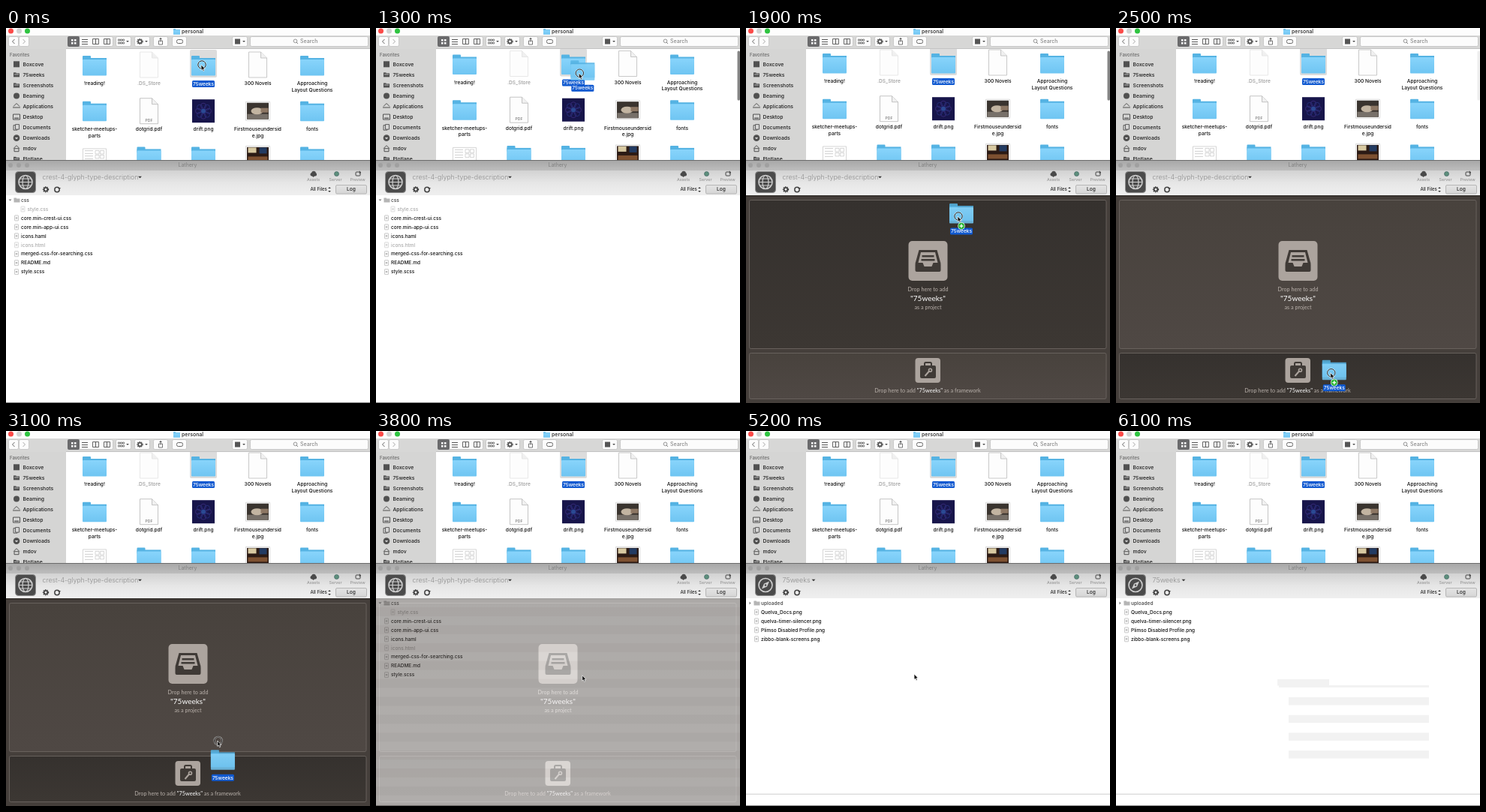
Write an HTML page with a canvas that moves like this. It is 485x500 px and loops after 6600 ms.

```html
<!DOCTYPE html>
<html lang="en">
<head>
<meta charset="utf-8">
<title>Drop a folder</title>
<style>
html, body { margin: 0; width: 100%; height: 100%; overflow: hidden; background: #fff; }
canvas { display: block; }
</style>
</head>
<body>
<canvas id="stage" width="485" height="500"></canvas>
<script>
const W = 485, H = 500, LOOP = 6600, STEP = 100, ROW = 11.95;
const SPLIT = 176, LIST_TOP = 223, TURN = Math.PI * 2;
const UI = 'Inter, sans-serif', SLAB = 'Lato, sans-serif';
const PROJECT = '75weeks';
const screen = document.getElementById('stage').getContext('2d');
const layer = document.createElement('canvas');
layer.width = W;
layer.height = H;
const layerCtx = layer.getContext('2d');
let c = screen;

const clamp = f => Math.min(1, Math.max(0, f));
const span = (t, from, to) => clamp((t - from) / (to - from));
const mix = (a, b, f) => a + (b - a) * f;
const smooth = f => f * f * (3 - 2 * f);
const times = (n, draw) => { for (let i = 0; i < n; i++) draw(i); };

// --- drawing helpers ---
function rect(x, y, w, h, fill) {
  c.fillStyle = fill;
  c.fillRect(x, y, w, h);
}

function paint(fill, stroke, lw = 1) {
  if (fill) { c.fillStyle = fill; c.fill(); }
  if (stroke) { c.strokeStyle = stroke; c.lineWidth = lw; c.stroke(); }
}

function box(x, y, w, h, r, fill, stroke, lw) {
  c.beginPath();
  c.roundRect(x, y, w, h, r);
  paint(fill, stroke, lw);
}

function oval(x, y, rx, ry, fill, stroke, lw) {
  c.beginPath();
  c.ellipse(x, y, rx, ry, 0, 0, TURN);
  paint(fill, stroke, lw);
}

const disc = (x, y, r, fill) => oval(x, y, r, r, fill);
const ring = (x, y, r, stroke, lw) => oval(x, y, r, r, null, stroke, lw);

function path(points, fill, stroke, lw) {
  c.beginPath();
  for (let i = 0; i < points.length; i += 2) c.lineTo(points[i], points[i + 1]);
  paint(fill, stroke, lw);
}

// Trapezoid symmetric about x.
function taper(x, top, bottom, half, foot, fill) {
  path([x - half, top, x + half, top, x + foot, bottom, x - foot, bottom], fill);
}

// Triangle pointing along a quarter turn: 0 right, 1 down, 2 left, 3 up.
function arrow(x, y, s, quarter, fill, stroke) {
  c.save();
  c.translate(x, y);
  c.rotate(quarter * Math.PI / 2);
  path([-s / 2, -s, s / 2, 0, -s / 2, s], fill, stroke);
  c.restore();
}

function text(s, x, y, size, color = '#111', align = 'left', weight = 500, font = UI) {
  c.font = `${weight} ${size}px ${font}`;
  c.fillStyle = color;
  c.textAlign = align;
  c.textBaseline = 'middle';
  c.fillText(s, x, y);
}

function ramp(y0, y1, ...colors) {
  const g = c.createLinearGradient(0, y0, 0, y1);
  colors.forEach((color, i) => g.addColorStop(i / (colors.length - 1), color));
  return g;
}

// --- icons ---
function folder(x, y, k = 1) {
  box(x - 16 * k, y - 13 * k, 11 * k, 8 * k, k, '#55b3e3');
  rect(x - 16 * k, y - 10 * k, 32 * k, 20 * k, '#55b3e3');
  box(x - 16 * k, y - 8 * k, 32 * k, 21.5 * k, k, ramp(y - 8 * k, y + 13 * k, '#88d4fb', '#6fc5f2'));
}

function page(x, y, stroke) {
  const l = x - 12, r = x + 12, t = y - 17, b = y + 17, fold = 8;
  path([l, t, r - fold, t, r, t + fold, r, b, l, b, l, t], '#fdfdfd', stroke, 0.8);
  path([r - fold, t, r - fold, t + fold, r, t + fold], '#f0f0f0', stroke, 0.8);
}

function gear(x, y, r, color) {
  ring(x, y, r * 0.65, color, r * 0.5);
  c.setLineDash([r * 0.36, r * 0.36]);
  ring(x, y, r, color, r * 0.35);
  c.setLineDash([]);
}

function miniFile(x, y, stroke) {
  box(x - 2.5, y - 3.5, 5, 7, 0.5, '#fafafa', stroke, 0.7);
  rect(x - 1.2, y - 1, 2.4, 2, stroke);
}

function miniFolder(x, y, color) {
  rect(x - 4, y - 3, 3.5, 2, color);
  rect(x - 4, y - 2, 8, 5, color);
}

// --- file browser window ---
function nameTag(x, y) {
  box(x - 15, y - 4.5, 30, 9, 1.5, '#1059d0');
  text(PROJECT, x, y + 0.3, 6.6, '#fff', 'center');
}

function toolbar() {
  const ink = '#555', mid = 18;
  const button = (x, w) => box(x + 0.5, 11.5, w, 13, 2, '#fcfcfc', '#c2c2c2', 0.8);
  rect(0, 0, W, 28, '#fdfdfd');
  rect(0, 10, W, 18, '#d7d7d6');
  rect(80, 27, W - 80, 1, '#c4c4c4');
  ['#fc4a48', '#d2d2d2', '#2fc441'].forEach((color, i) => disc(6.5 + i * 11, 4, 3.5, color));
  folder(227.5, 5, 0.28);
  text('personal', 234, 5, 7, '#222');

  button(3, 13);
  button(17, 13);
  arrow(10, mid, 3, 2, null, '#666');
  arrow(24, mid, 3, 0, null, '#aaa');
  button(82, 60);
  box(82, 11, 16, 14, 2, '#6a6a6c');
  times(4, i => rect(87 + i % 2 * 4, 15 + (i >> 1) * 4, 2.5, 2.5, '#fff'));
  times(3, i => rect(101, 15 + i * 3, 8, 1, ink));
  times(2, i => {
    box(115.5 + i * 15, 14.5, 8, 7, 0, null, ink, 0.9);
    rect(119 + i * 15, 14.5, 1, 7, ink);
  });
  button(146, 20);
  times(6, i => box(149.5 + i % 3 * 3, 15 + (i / 3 | 0) * 4, 2, 2, 0, null, ink, 0.7));
  button(171, 20);
  gear(178.5, mid, 3.6, ink);
  button(196, 19);
  box(203.5, 17, 5, 5, 0, null, ink, 0.8);
  rect(205.6, 13.5, 0.8, 5, ink);
  arrow(206, 14, 2, 3, ink);
  button(221, 19);
  box(227.5, 15.5, 8, 5, 2, null, ink, 0.9);
  button(301, 20);
  rect(305, 14.5, 7, 7, ink);
  [162, 187, 317].forEach(x => arrow(x, mid, 1.8, 1, '#444'));
  button(325, 157);
  ring(385.5, 17.3, 2.3, '#888', 0.9);
  path([387, 19, 389, 21], null, '#888');
  text('Search', 392, mid + 0.3, 7, '#888');
}

const sideInk = '#505050';
const sideIcons = {
  square: (x, y) => rect(x - 4, y - 4, 8, 8, sideInk),
  disc: (x, y) => disc(x, y, 4, sideInk),
  folder: (x, y) => {
    miniFolder(x, y, sideInk);
    rect(x - 3, y - 0.8, 6, 0.8, '#ccc');
  },
  apps: (x, y) => {
    arrow(x, y - 2, 4, 3, null, sideInk);
    rect(x - 5, y + 1, 10, 1, sideInk);
  },
  desk: (x, y) => {
    box(x - 4.5, y - 3.5, 9, 7, 0, null, sideInk);
    rect(x - 3, y + 1, 6, 1.2, sideInk);
  },
  docs: (x, y) => times(2, i => box(x - 4 + i * 2.5, y - 3 - i, 5, 6.5, 0, '#d5d5d5', sideInk, 0.9)),
  down: (x, y) => {
    disc(x, y, 4.3, sideInk);
    arrow(x, y + 0.5, 2.2, 1, '#ddd');
  },
  home: (x, y) => {
    arrow(x, y - 2, 4, 3, null, sideInk);
    box(x - 3, y, 6, 4, 0, null, sideInk);
  }
};
const places = [
  ['Boxcove', 'square'], [PROJECT, 'folder'], ['Screenshots', 'folder'], ['Beaming', 'disc'],
  ['Applications', 'apps'], ['Desktop', 'desk'], ['Documents', 'docs'], ['Downloads', 'down'],
  ['mdov', 'home'], ['Plotlane', 'folder']
];

function sidebar() {
  rect(0, 28, 80, SPLIT - 27, '#d5d5d4');
  text('Favorites', 5, 36.3, 6, '#666');
  places.forEach(([name, icon], i) => {
    const y = 48.3 + i * 14.05;
    sideIcons[icon](14, y);
    text(name, 22.5, y + 0.4, 6.8, '#1c1c1c');
  });
}

function frame(x, y, h, fill) {
  box(x - 16, y - h / 2, 32, h, 0, '#fff', '#ccc', 0.7);
  rect(x - 14.5, y - h / 2 + 1.5, 29, h - 3, fill);
}

const thumbs = {
  folder,
  page: (x, y) => page(x, y - 1, '#bbb'),
  faint: (x, y) => page(x, y - 1, '#e2e2e2'),
  chosen: (x, y) => {
    box(x - 18, y - 21, 36, 37, 2, '#dcdcdc');
    folder(x, y);
  },
  pdf: (x, y) => {
    page(x, y, '#b5b5b5');
    text('PDF', x, y + 12.5, 5, '#777', 'center');
  },
  pattern: (x, y) => {
    rect(x - 15, y - 15.5, 30, 31, '#17154a');
    times(8, i => {
      const a = i * TURN / 8;
      ring(x + Math.cos(a) * 7, y + Math.sin(a) * 7, 3.5, i % 2 ? '#26327c' : '#392b7a', 0.9);
    });
    disc(x, y, 3, '#2b4a94');
  },
  hand: (x, y) => {
    frame(x, y, 25, '#3a342f');
    rect(x - 14, y + 4, 28, 7, '#777069');
    oval(x - 1, y, 8, 4.5, '#c2b4a1');
    rect(x + 4, y - 4, 10, 6, '#8d7764');
  },
  desk: (x, y) => {
    frame(x, y, 28, '#2c1b15');
    rect(x - 13, y - 12, 11, 7, '#d8c9a1');
    rect(x + 2, y - 12, 10, 8, '#233b62');
    rect(x - 13, y, 26, 6, '#7e5131');
  },
  sheet: (x, y) => {
    box(x - 15.5, y - 10.5, 31, 22, 0, '#fff', '#ccc', 0.8);
    times(4, i => {
      rect(x - 13, y - 8 + i * 3.5, 11, 0.7, '#bbb');
      box(x + 1 + i % 2 * 6.5, y - 8 + (i >> 1) * 6, 5, 4.5, 0, null, '#c5c5c5', 0.7);
    });
  }
};
const files = [
  ['folder', '!reading!'], ['faint', '.DS_Store'], ['chosen', ''], ['page', '300 Novels'],
  ['folder', 'Approaching', 'Layout Questions'],
  ['folder', 'sketcher-meetups-', 'parts'], ['pdf', 'dotgrid.pdf'], ['pattern', 'drift.png'],
  ['hand', 'Firstmouseundersid', 'e.jpg'], ['folder', 'fonts'],
  ['sheet'], ['folder'], ['folder'], ['desk'], ['folder']
];

function browser(t) {
  c.save();
  c.beginPath();
  c.rect(0, 0, W, SPLIT + 1);
  c.clip();
  rect(0, 0, W, SPLIT + 1, '#fff');
  const scroll = 3 * span(t, 1200, 1400);
  files.forEach(([kind, ...lines], i) => {
    const x = 118 + i % 5 * 72.5, y = 50 + (i / 5 | 0) * 60.7 - scroll;
    thumbs[kind](x, y);
    lines.forEach((s, n) => text(s, x, y + 24.5 + n * 8.5, 6.6,
      kind === 'faint' ? '#999' : '#111', 'center'));
    if (kind === 'chosen') nameTag(x, y + 24.5);
  });
  toolbar();
  sidebar();
  if (t >= 1300) {
    c.globalAlpha = 1 - span(t, 1900, 2600);
    box(481.5, 30.5, 3.5, 66, 1.5, '#858585');
    c.globalAlpha = 1;
  }
  c.restore();
}

// --- project window ---
function projectIcon(done) {
  const x = 26, y = 205.5, ink = '#cfcfcf';
  box(12.5, 191.5, 27, 28, 4, '#4b4b4b', '#8b8b8b');
  ring(x, y, 9, ink, 1.6);
  if (done) {
    path([x + 5, y - 5, x + 2, y + 2, x - 5, y + 5, x - 2, y - 2], ink);
    disc(x, y, 1.2, '#4b4b4b');
  } else {
    oval(x, y, 4, 9, null, ink, 1.2);
    times(3, i => rect(x - 8, y - 5 + i * 4.5, 16, 1, ink));
  }
}

function header(done) {
  rect(0, SPLIT, W, 15, ramp(SPLIT, 190, '#a6a6a6', '#bdbdbd'));
  rect(0, SPLIT, W, 1, '#6b6b6b');
  times(3, i => disc(6 + i * 11, 183, 3, '#a0a0a0'));
  text('Lathery', 242, 183, 7, '#808080', 'center', 400);
  rect(0, 190, W, LIST_TOP - 190, ramp(190, LIST_TOP, '#d2d2d2', '#e6e6e6', '#efefef'));
  projectIcon(done);
  text(done ? PROJECT : 'crest-4-glyph-type-description', 48.5, 199.5,
    done ? 9 : 8.8, '#8e8e8e', 'left', 300);
  arrow(done ? 90 : 178.5, 199, 2.4, 1, '#333');
  gear(53, 215.3, 3.6, '#444');
  ring(68, 215.5, 3.2, '#444', 1.5);
  arrow(71, 214, 2.2, 1, '#444');

  box(405.5, 193, 8.5, 4.5, 2, '#4a4a4a');
  disc(410, 193.5, 2.8, '#4a4a4a');
  arrow(409.5, 198, 1.8, 1, '#4a4a4a');
  oval(440.5, 194.5, 3, 3, '#5d8f7c', '#466', 0.7);
  box(466, 192, 6, 5, 1, null, '#444');
  arrow(472, 192.5, 2.2, 0, '#444');
  ['Assets', 'Server', 'Preview'].forEach((s, i) =>
    text(s, 409.5 + i * 29.5, 202.5, 5.4, '#8b8b8b', 'center', 400));
  text('All Files', 405.5, 215.5, 6, '#222');
  arrow(431, 213, 1.8, 3, '#333');
  arrow(431, 218, 1.8, 1, '#333');
  box(439.5, 209.5, 41, 11.5, 1.5, ramp(209, 221, '#e4e4e4', '#d6d6d6'), '#aaa', 0.8);
  text('Log', 460, 215.5, 6.6, '#222', 'center');
}

const before = ['css', 'style.css', 'core.min-crest-ui.css', 'core.min-app-ui.css',
  'icons.haml', 'icons.html', 'merged-css-for-searching.css', 'README.md', 'style.scss'];
const after = ['uploaded', 'Quelva_Docs.png', 'quelva-timer-silencer.png',
  'Plimso Disabled Profile.png', 'zibbo-blank-screens.png'];
const ignored = ['style.css', 'icons.html'];

function fileList(done) {
  (done ? after : before).forEach((s, i) => {
    const y = 229.5 + i * ROW, dim = ignored.includes(s);
    const indent = s === 'style.css' ? 8.5 : 0;
    if (i === 0) {
      arrow(5.5, y, 2, done ? 0 : 1, '#777');
      miniFolder(14.5, y, '#b5b5b5');
    } else {
      miniFile(14 + indent, y, dim ? '#d0d0d0' : '#b5b5b5');
    }
    text(s, 20 + indent, y + 0.3, 6.5, i === 0 ? '#555' : dim ? '#aaa' : '#111',
      'left', i === 0 ? 600 : 500);
  });
}

function statusBar(t) {
  const y = 492 + Math.max(0, t - 4200) * 0.06;
  text('Adding Project', 239, y + 1, 7, '#777', 'center', 400);
  gear(8, y, 3.6, '#666');
  disc(477, y, 4, '#666');
  text('×', 477, y, 7, '#fff', 'center');
}

function placeholder(alpha) {
  c.globalAlpha = alpha;
  rect(215, 331, 69, 8.5, '#f2f2f2');
  rect(217, 339, 200, 3, '#f2f2f2');
  times(4, i => rect(230, 355 + i * 23.7, 187, 10.5, '#f2f2f2'));
  c.globalAlpha = 1;
}

// --- drop zones ---
const plate = '#aca49e', dark = '#3f3a36', soft = '#b9b1ab';

function zone(y, h, active) {
  const fill = active ? ramp(y, y + h, '#35312e', '#3c3733') : ramp(y, y + h, '#48423d', '#4f4844');
  box(4.5, y + 0.5, 475.5, h, 2, fill, '#6b6560', 0.9);
}

function richLine(parts, x, y, size) {
  c.font = `400 ${size}px ${SLAB}`;
  const widths = parts.map(p => c.measureText(p).width);
  let left = x - widths.reduce((a, b) => a + b) / 2;
  parts.forEach((p, i) => {
    text(p, left, y, size, i === 1 ? '#fff' : soft, 'left', 400, SLAB);
    left += widths[i];
  });
}

function dropZones(hover) {
  const x = 242.5;
  rect(0, LIST_TOP, W, H - LIST_TOP, '#453f3b');
  rect(0, LIST_TOP, W, 2, '#38332f');
  zone(229, 198, hover === 'project');
  zone(433, 61, hover === 'framework');

  box(x - 26, 284, 52, 53, 5, plate);
  taper(x, 296, 314, 12, 17, dark);
  box(x - 17, 313, 34, 12, 2, dark);
  taper(x, 299, 313, 9.5, 13, plate);
  times(2, i => rect(x - 8 - i, 303 + i * 5, 16 + i * 2, 2.5, dark));
  taper(x, 313, 318, 7, 5, plate);
  text('Drop here to add', x, 348.5, 7.2, soft, 'center', 400, SLAB);
  text(`"${PROJECT}"`, x, 360.5, 10, '#fff', 'center', 400, SLAB);
  text('as a project', x, 372.5, 7.2, soft, 'center', 400, SLAB);

  box(x - 17, 440, 33.5, 33, 4, plate);
  box(x - 4.5, 446, 9, 5, 1.5, null, dark, 2);
  box(x - 10.5, 450, 21, 17, 2, dark);
  path([x - 4, 464, x + 2, 457], null, plate, 2);
  ring(x + 3, 456.3, 2, plate, 1.6);
  richLine(['Drop here to add ', `"${PROJECT}"`, ' as a framework'], x - 0.5, 483.3, 7.3);
}

function overlay(t) {
  const fade = t < 2000 ? span(t, 1500, 1900) ** 2.5 : (1 - span(t, 3700, 4000)) ** 2;
  if (!fade) return;
  c = layerCtx;
  dropZones(fade < 1 ? 'none' : t >= 2500 && t < 3200 ? 'framework' : 'project');
  c = screen;
  c.globalAlpha = fade;
  c.drawImage(layer, 0, 0);
  // Alternate list rows stay visible while the panel is translucent.
  c.globalAlpha = 0.14 * (1 - fade) ** 2;
  times(12, i => rect(0, LIST_TOP + (i * 2 + 1) * ROW, W, Math.min(ROW, H), '#453f3b'));
  c.globalAlpha = 1;
}

// --- motion ---
const home = { x: 261, y: 49 };
const legs = [
  { from: 1200, to: 1900, x: 283, y: 251, bulge: 21 },
  { from: 1900, to: 2600, x: 287, y: 472 },
  { from: 2600, to: 2700, x: 286, y: 457 },
  { from: 3000, to: 3300, x: 276, y: 325, ease: f => f, carry: f => f * f },
  { from: 3700, to: 4100, x: 274, y: 330 },
  { from: 4600, to: 4700, x: 278, y: 331 },
  { from: 4800, to: 5200, x: 225, y: 324 },
  { from: 5300, to: 5500, x: 216, y: 324 }
];

function position(t, carrying) {
  let { x, y } = home;
  for (const leg of legs) {
    const f = span(t, leg.from, leg.to);
    const ease = carrying && leg.carry || leg.ease || smooth;
    x = mix(x, leg.x, ease(f)) + (leg.bulge || 0) * Math.sin(Math.PI * f);
    y = mix(y, leg.y, ease(f));
  }
  return { x, y };
}

function carried(t) {
  const p = position(t, true), x = p.x + 4, y = p.y - 4;
  c.globalAlpha = 0.86;
  folder(x, y);
  c.globalAlpha = 1;
  nameTag(x, y + 24);
  if (t < 1700 || t >= 3100) return;
  disc(x, y + 17, 4.8, '#fff');
  disc(x, y + 17, 4.2, '#25b531');
  rect(x - 2.5, y + 16.4, 5, 1.3, '#fff');
  rect(x - 0.65, y + 14.5, 1.3, 5, '#fff');
}

function pointer(t, pressed) {
  const { x, y } = position(t);
  if (pressed) {
    ring(x, y, 5.2, 'rgba(255,255,255,.6)', 2);
    ring(x, y, 5.2, '#222');
  }
  c.save();
  c.translate(x - 1, y);
  path([0, 0, 0, 7.4, 1.7, 6, 2.9, 8.7, 4.2, 8.1, 3.1, 5.5, 5.3, 5.4, 0, 0], '#111', '#fff', 0.7);
  c.restore();
}

function draw(t) {
  const done = t >= 4000;
  rect(0, 0, W, H, '#fff');
  browser(t);
  header(done);
  fileList(done);
  if (done) {
    rect(0, 483.5, W, 1.5, '#dedede');
    if (t < 4500) statusBar(t);
  }
  if (t >= 5700) placeholder(span(t, 5600, 6100));
  rect(0, H - 1, W, 1, '#8a8a8a');
  overlay(t);
  if (t >= 1300 && t < 3800) carried(t);
  if (t < 5700) pointer(t, t < 100 || (t >= 900 && t < 3800));
}

const start = performance.now();
let last = -1;
function tick() {
  const t = Math.floor((performance.now() - start) % LOOP / STEP) * STEP;
  if (t !== last) draw(last = t);
  requestAnimationFrame(tick);
}
tick();
</script>
</body>
</html>
```
